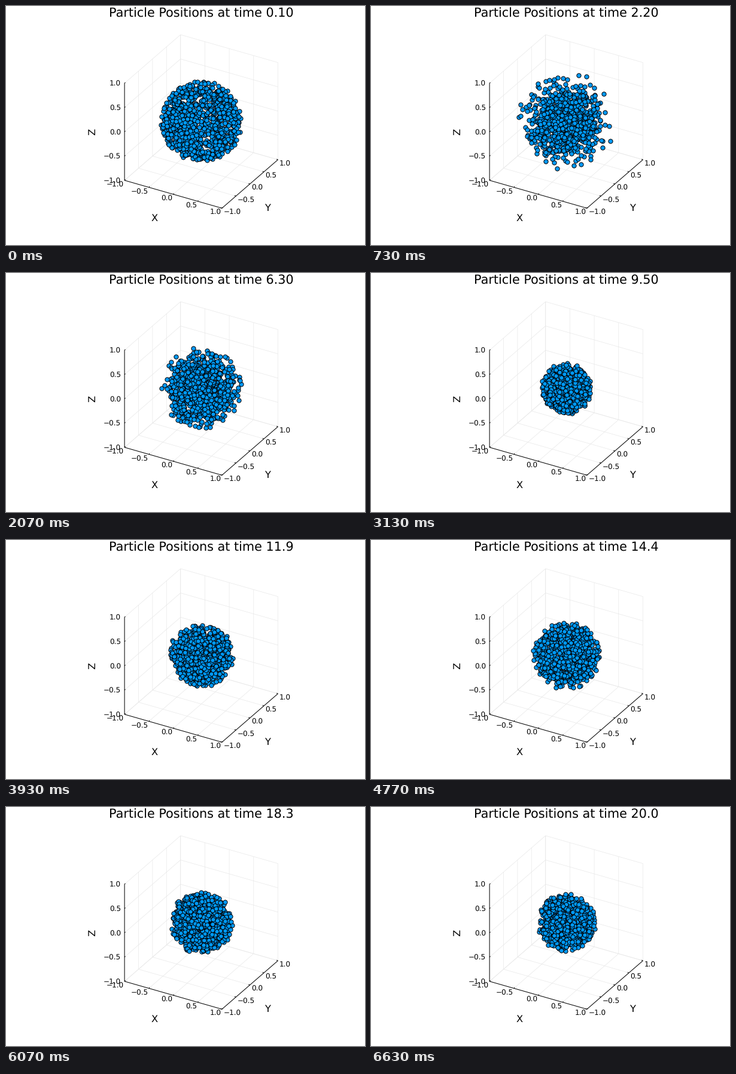
Write a matplotlib script that moves like this. It is 600x400 px and loops after 6.66 s.

```python
import numpy as np
import matplotlib.pyplot as plt
from matplotlib.animation import FuncAnimation

W, H, DPI = 600, 400, 100
FRAMES, LOOP = 200, 6660
PX = 72 / DPI  # points per pixel
COUNT = 1000

plt.rcParams["font.family"] = "DejaVu Sans"
plt.rcParams["text.hinting"] = "none"

fig = plt.figure(figsize=(W / DPI, H / DPI), dpi=DPI, facecolor="white")
ax = fig.add_axes([0, 0, 1, 1])
ax.set_xlim(0, W)
ax.set_ylim(H, 0)
ax.axis("off")

# orthographic view of the cube [-1, 1]^3: azimuth 30, elevation 30 degrees
CENTER = np.array([326.3, 193.2])
VIEW = np.array([[81.4, 23.3], [46.8, -40.6], [0, -81.3]])


def project(points):
    return CENTER + np.asarray(points, float) @ VIEW


def line(points, color="black", width=1.0, z=2):
    x, y = project(points).T
    ax.plot(x, y, color=color, lw=width * PX, zorder=z, solid_capstyle="butt")


def label(x, y, text, size, **kw):
    kw = {"ha": "center", "va": "baseline", **kw}
    return ax.text(x, y, text, fontsize=size * PX, color="black", zorder=5, **kw)


# grid on the two back walls and the floor, then axes and ticks
for v in (-1, -0.5, 0, 0.5, 1):
    line([(v, -1, -1), (v, 1, -1), (v, 1, 1)], "#e8e8e8", 0.7, 1)
    line([(1, v, -1), (-1, v, -1), (-1, v, 1)], "#e8e8e8", 0.7, 1)
    line([(-1, -1, v), (-1, 1, v), (1, 1, v)], "#e8e8e8", 0.7, 1)

    line([(v, -1, -1), (v, -0.97, -1)])
    line([(1, v, -1), (0.97, v, -1)])
    line([(-1, -1, v), (-1, -0.97, v)])

    name = f"{v:.1f}".replace("-", "\u2212")
    x, y = project((v, -1, -1))
    label(x - 1.2, y + 10.9, name, 12, ha="right")
    x, y = project((1, v, -1))
    label(x + 2.6, y + 10.3, name, 12, ha="left")
    x, y = project((-1, -1, v))
    label(x - 6.2, y + 4.9, name, 12, ha="right")

line([(-1, -1, 1), (-1, -1, -1), (1, -1, -1), (1, 1, -1)])

label(248, 360, "X", 16.3)
label(437.2, 342.6, "Y", 16.3)
label(145, 210, "Z", 16.3, rotation=90, va="center")
title = label(326, 19, "", 20.8)

# each particle circles in its own plane while its radius swings in and out
rng = np.random.default_rng(7)


def unit(v):
    return v / np.linalg.norm(v, axis=1, keepdims=True)


start = unit(rng.normal(size=(COUNT, 3)))
side = unit(np.cross(start, rng.normal(size=(COUNT, 3))))
spin = rng.normal(0, 0.25, COUNT)
phase = rng.uniform(0, 2, COUNT)
rate = rng.uniform(0.03, 0.1, COUNT)

# outer radius of the cloud over time
R_T = [0, 0.1, 1.8, 2.6, 4.2, 6.3, 7.4, 8.4, 9.5, 10.2, 11.2, 12.4, 14.6, 16.7, 18, 20]
R_V = [.73, .73, .88, .88, .77, .74, .71, .65, .46, .47, .54, .61, .61, .555, .57, .52]
# how evenly the ball is filled, and the share of its sparse outer halo
SHAPE_T = [0, 2.3, 6.3, 9.5, 20]
FILL = [0.19, 0.45, 0.44, 0.32, 0.32]
HALO = [0, 0.28, 0.12, 0.06, 0.04]


def positions(t):
    u = np.abs((phase + rate * t) % 2 - 1)
    fill = np.interp(t, SHAPE_T, FILL)
    halo = np.interp(t, SHAPE_T, HALO)
    rho = (1 - halo) * u ** fill + halo * u ** 8
    a = (spin * t)[:, None]
    ring = start * np.cos(a) + side * np.sin(a)
    return ring * (rho * np.interp(t, R_T, R_V))[:, None]


dots, = ax.plot([], [], "o", ms=7.2 * PX, mfc="#009afa", mec="black",
                mew=1.0 * PX, zorder=4)


def update(i):
    t = (i + 1) / 10
    dots.set_data(*project(positions(t)).T)
    stamp = f"{t:.2f}"[:4]
    title.set_text(f"Particle Positions at time {stamp}")
    return dots, title


anim = FuncAnimation(fig, update, frames=FRAMES, interval=LOOP / FRAMES,
                     repeat=True, repeat_delay=0, blit=False)
plt.show()
```
